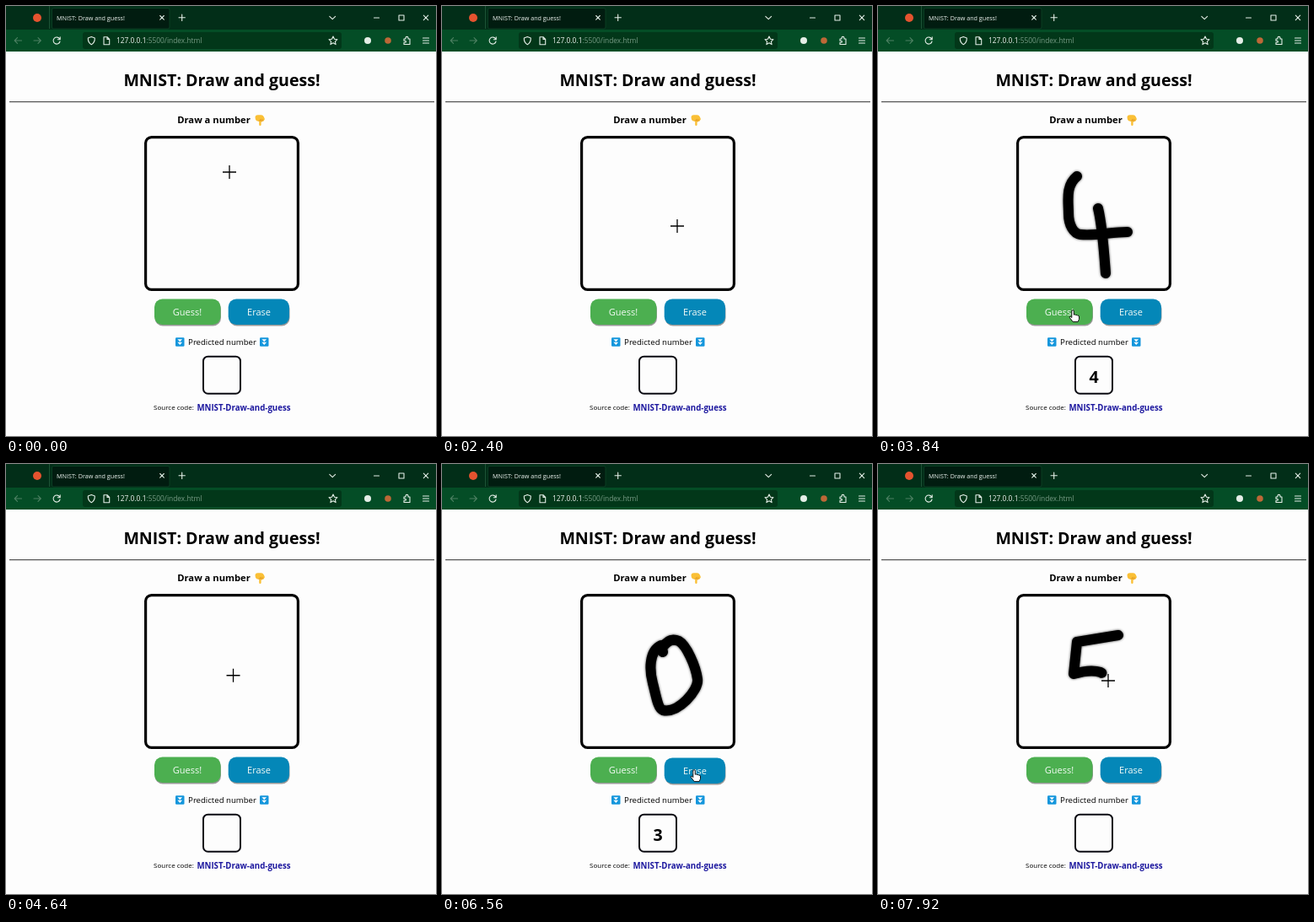
Animation, 510 px wide and 510 px high, one loop 8000 ms. Source, as an HTML page:

```html
<!DOCTYPE html>
<html lang="en">
<head>
<meta charset="utf-8">
<title>MNIST: Draw and guess!</title>
<style>
  html, body { margin: 0; width: 100%; height: 100%; overflow: hidden; background: #fdfdfd; }
  svg { display: block; width: 100vw; height: 100vh; font-family: "Open Sans", "Noto Sans", sans-serif; }
  .mid { text-anchor: middle; }
  .bold { font-weight: 700; }
  .icons { fill: none; stroke: #e4eee7; stroke-width: 1.1; stroke-linecap: round; stroke-linejoin: round; }
  .dim { stroke: #4d8062; }
  .button text { fill: #f4fbf6; font-size: 11px; text-anchor: middle; }
  .ink { fill: none; stroke: #000; stroke-width: 12; stroke-linecap: round; stroke-linejoin: round; }
  #ink { filter: drop-shadow(0 0 1.6px rgba(0, 0, 0, .75)); }
  .pointer { fill: #fff; stroke: #000; stroke-width: .9; stroke-linejoin: round; }
</style>
</head>
<body>
<svg viewBox="0 0 510 510" xmlns="http://www.w3.org/2000/svg">
  <defs>
    <g id="down">
      <rect width="10.5" height="10.5" rx="1.2" fill="#1496dc"/>
      <path d="M2.4 2h5.7L5.25 5zM2.4 5.4h5.7L5.25 8.6z" fill="#fff"/>
    </g>
  </defs>
  <rect width="510" height="510" fill="#fdfdfd"/>

  <!-- browser window -->
  <rect width="510" height="28" fill="#022e18"/>
  <rect y="28" width="510" height="26" fill="#044d26"/>
  <path d="M51.5 0V27" stroke="#1c5335"/>
  <rect x="54.5" y="2.5" width="139.500" height="24.500" rx="2" fill="#011c10" stroke="#0d4528" stroke-width=".8"/>
  <rect x="91" y="31" width="307" height="20" rx="3" fill="#023719"/>
  <circle cx="37" cy="14" r="5" fill="#e5532f"/>
  <text class="mid" x="100.5" y="17" font-size="7.2" fill="#f0f5f1">MNIST: Draw and guess!</text>
  <text x="131" y="44.300" font-size="8.4" fill="#f0f5f1">127.0.0.1<tspan fill="#779b85">:5500/index.html</tspan></text>
  <g class="icons">
    <path d="M182.700 11.500l4.600 4.600m0-4.600l-4.600 4.600M205 13.800h7.400m-3.700-3.700v7.400M383.800 12.400l3.400 3.200 3.400-3.200"/>
    <path d="M436.500 14h6M466 11h6v6h-6zM495.300 11.200l5.400 5.400m0-5.400l-5.400 5.400"/>
    <path class="dim" d="M18.500 41h-8.300m3.300-3.400L10.200 41l3.300 3.400M33 41h8.300M38 37.600l3.300 3.400-3.300 3.400"/>
    <path d="M63.700 39.300a4 4 0 1 0 .3 2.700M64.200 36.800v2.900h-2.900"/>
    <path d="M101.300 36.500l4 1.500q.2 5.500-4 7.800-4.200-2.300-4-7.800z"/>
    <path d="M116 36.700h4l2.700 2.700v6.300H116zM120 36.700v2.700h2.700"/>
    <path d="M388 36l1.500 3.300 3.500.4-2.600 2.400.7 3.500-3.100-1.800-3.100 1.800.7-3.500-2.600-2.400 3.500-.4z"/>
    <path d="M472 39h2v-1q0-1.600 1.500-1.600T477 38v1h2v6.500h-7V43.300h1.300q1.200 0 1.200-1t-1.200-1H472z"/>
    <path d="M494.500 38h7m-7 3h7m-7 3h7"/>
  </g>
  <circle cx="429" cy="41" r="4" fill="#e4eee7"/>
  <circle cx="453" cy="41" r="3.8" fill="#bd6837"/>

  <!-- page -->
  <text class="mid bold" x="256" y="94.500" font-size="19.6">MNIST: Draw and guess!</text>
  <path d="M4 113.700H508" stroke="#555" stroke-width="1.3"/>
  <text class="mid bold" x="246.500" y="139.300" font-size="11.2">Draw a number</text>
  <path d="M295.500 131.500q.5-2.300 3-2.300h4.200q2 0 3 2l1 2.400q.5 1.400-.6 1.800-.4 1.300-1.600 1.200-.6 1.100-1.900.7v3.500q0 1.200-1.200 1.200t-1.200-1.200v-4.100q-3.500.2-4.300-2.200z" fill="#fac036"/>
  <path d="M299.600 136.300q2.600-.2 2.700-2.400m.6 3.300l-.4-2.300m2.200 1.700l-.8-2.400" fill="none" stroke="#d98b20" stroke-width=".7"/>
  <rect x="165.600" y="155.600" width="180.800" height="180.800" rx="7" fill="#fdfdfd" stroke="#000" stroke-width="3.2"/>
  <g id="ink"></g>

  <g class="button" id="guess">
    <rect x="176.500" y="349.500" width="78.500" height="30" rx="9.500" fill="#999"/>
    <rect x="176" y="347.500" width="78.500" height="30.500" rx="9.500" fill="#4caf50"/>
    <text x="215" y="367">Guess!</text>
  </g>
  <g class="button" id="erase">
    <rect x="264.500" y="349.500" width="72" height="30" rx="9.500" fill="#999"/>
    <rect x="263.700" y="347.500" width="72.300" height="30.500" rx="9.500" fill="#0487b8"/>
    <text x="300" y="367">Erase</text>
  </g>

  <use href="#down" x="201" y="393.300"/>
  <text class="mid" x="256.500" y="402" font-size="9.6">Predicted number</text>
  <use href="#down" x="301" y="393.300"/>
  <rect x="234" y="415.700" width="44" height="44" rx="5.500" fill="#fdfdfd" stroke="#0b0b12" stroke-width="2"/>
  <text id="answer" class="mid bold" x="256" y="446.700" font-size="19.6"></text>
  <text class="mid" x="199" y="479.300" font-size="8">Source code:</text>
  <text class="mid bold" x="282" y="479.700" font-size="9.7" fill="#1d189f">MNIST-Draw-and-guess</text>

  <g id="cursor">
    <path id="cross" d="M-8 0H8M0-8V8" stroke="#000" stroke-width="1.3"/>
    <path id="hand" class="pointer" d="M-1.200 8.600V.9a1.250 1.250 0 0 1 2.500 0V5.200q2-.8 2.300.4 1.800-.5 2.100.6 1.600-.4 1.800.8V10.400l-1.400 3.200H.2L-3.600 8.700q-.6-1.600.9-1.400z"/>
    <path id="arrow" class="pointer" d="M0 0V12l2.800-2.600 1.800 4.200 1.700-.7-1.800-4.100h3.800z"/>
  </g>
</svg>
<script>
const LOOP = 8000, STEP = 80;
const $ = id => document.getElementById(id);
const clamp = v => Math.max(0, Math.min(1, v));
const ease = v => v * v * (3 - 2 * v);

// start, end, cleared at, path
const strokes = [
  [80, 560, 1840, 'M262 193C263 215 261 235 258 272'],
  [2720, 3120, 4400, 'M236 202C222 213 226 232 226 246C226 260 232 270 240 271C258 273 276 268 296 268'],
  [3200, 3440, 4400, 'M261 240C266 260 268 290 270 317'],
  [4720, 5200, 6640, 'M262 223L260 215C245 222 246 245 250 260C254 275 256 290 262 292C272 294 282 288 290 280C298 272 304 262 303 255C301 240 290 215 281 210C272 206 266 211 262 217'],
  [7040, 7920, LOOP, 'M285 203L236 211L232 249Q252 243 264 247Q270 250 273 257']
].map(([start, end, clear, d]) => {
  const path = document.createElementNS('http://www.w3.org/2000/svg', 'path');
  path.setAttribute('class', 'ink');
  path.setAttribute('d', d);
  $('ink').append(path);
  return { start, end, clear, path, length: path.getTotalLength() };
});

// time, x, y of the pointer between strokes
const moves = [
  [0, 265, 197], [80, 262, 193], [560, 258, 272], [880, 234, 362], [1280, 234, 362],
  [1680, 300, 363], [1920, 300, 363], [2400, 279, 261], [2640, 236, 202], [3120, 296, 268],
  [3200, 261, 240], [3440, 270, 317], [3680, 231, 361], [4000, 231, 361], [4320, 300, 363],
  [4440, 300, 363], [4720, 262, 223], [5200, 262, 217], [5440, 225, 357], [6160, 225, 357],
  [6480, 299, 363], [6720, 299, 363], [7040, 285, 203], [LOOP, 273, 257]
];
const answers = [[1040, 1840, '1'], [3760, 4400, '4'], [5600, 6640, '3']];
const presses = { guess: [960, 3680, 5520], erase: [1760, 4320, 6560] };

function pointer(t) {
  const s = strokes.find(s => t >= s.start && t <= s.end);
  if (s) return s.path.getPointAtLength(s.length * (t - s.start) / (s.end - s.start));
  const i = moves.findIndex(m => m[0] > t);
  const [t0, x0, y0] = moves[i - 1], [t1, x1, y1] = moves[i];
  const p = ease((t - t0) / (t1 - t0));
  return { x: x0 + (x1 - x0) * p, y: y0 + (y1 - y0) * p };
}

function cursorKind({ x, y }) {
  if (x > 164 && x < 348 && y > 154 && y < 338) return 'cross';
  const onButton = y > 347 && y < 379 && (x > 176 && x < 255 || x > 264 && x < 336);
  return onButton ? 'hand' : 'arrow';
}

function draw(now) {
  const t = Math.floor((now % LOOP) / STEP) * STEP;

  // ink trails the pointer by one step
  for (const s of strokes) {
    const p = clamp((t - STEP - s.start) / (s.end - s.start));
    s.path.style.display = t >= s.start + STEP && t < s.clear ? '' : 'none';
    s.path.style.strokeDasharray = p < 1 ? `${Math.max(.01, p * s.length)} ${s.length * 2}` : 'none';
  }

  const at = pointer(t), kind = cursorKind(at);
  $('cursor').setAttribute('transform', `translate(${at.x} ${at.y})`);
  for (const id of ['cross', 'hand', 'arrow']) $(id).style.display = id === kind ? '' : 'none';

  for (const id in presses) {
    $(id).setAttribute('transform', `translate(0 ${presses[id].includes(t) ? 1 : 0})`);
  }
  const answer = answers.find(([from, to]) => t >= from && t < to);
  $('answer').textContent = answer ? answer[2] : '';
}

const begin = performance.now();
function tick() {
  draw(performance.now() - begin);
  requestAnimationFrame(tick);
}
tick();
</script>
</body>
</html>
```
